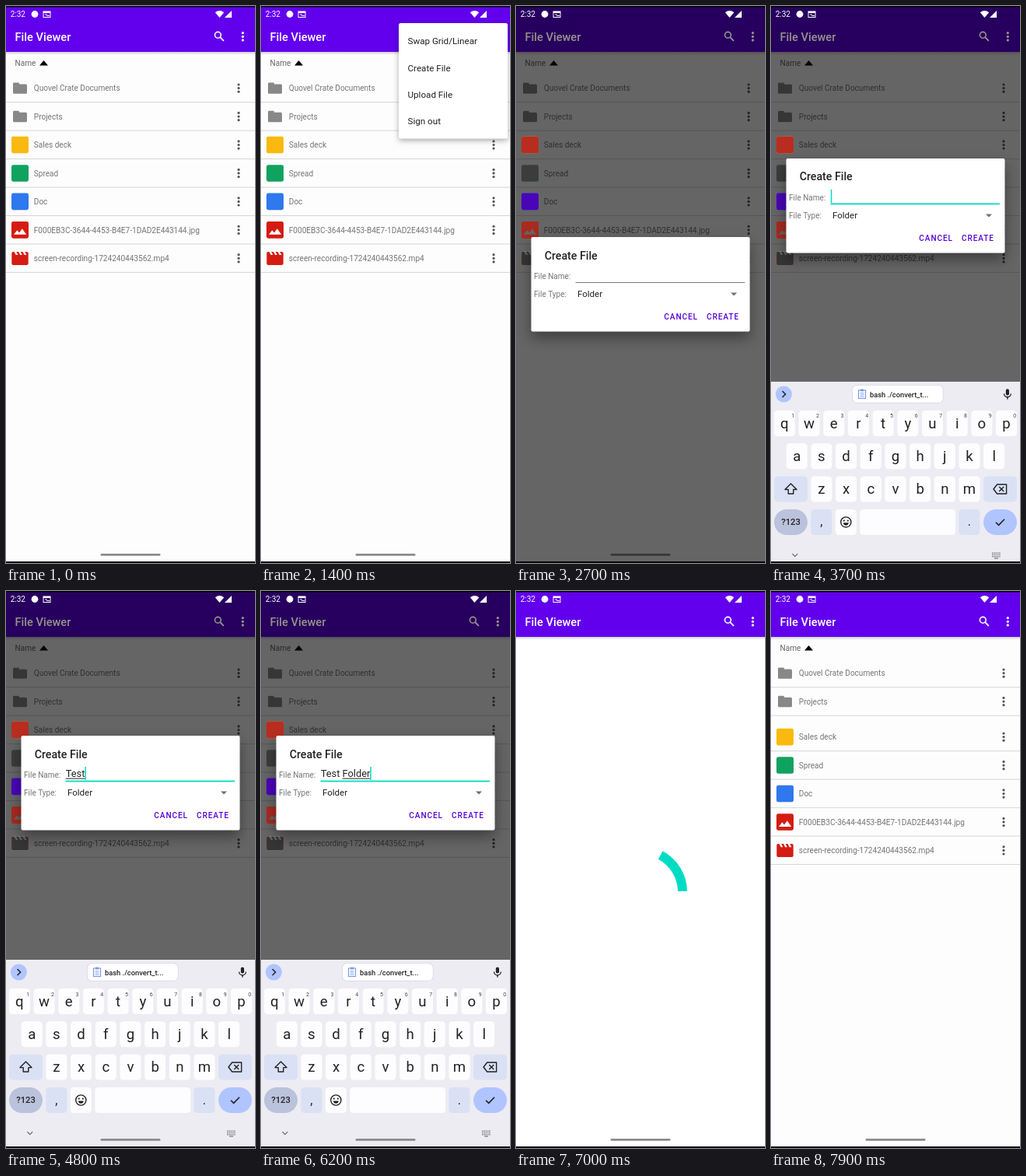
An HTML page with a canvas for the animation above (8000 ms loop, 320x716 px).

```html
<!DOCTYPE html>
<html lang="en">
<head>
<meta charset="utf-8">
<title>File Viewer</title>
<style>
html, body { margin: 0; width: 100%; height: 100%; overflow: hidden; background: #fff; }
canvas { display: block; width: 100vw; height: 100vh; }
</style>
</head>
<body>
<canvas id="stage"></canvas>
<script>
const W = 320, H = 716, LOOP = 8000, STEP = 100;
const PURPLE = '#6200ee', TEAL = '#03dac5', GREY = '#757575', INK = '#222';
const canvas = document.getElementById('stage');
const dpr = window.devicePixelRatio || 1;
canvas.width = W * dpr;
canvas.height = H * dpr;
const c = canvas.getContext('2d');

// Drawing helpers
const ramp = (t, a, b) => Math.min(1, Math.max(0, (t - a) / (b - a)));

function rect(x, y, w, h, fill) {
  c.fillStyle = fill;
  c.fillRect(x, y, w, h);
}

function round(x, y, w, h, r, fill) {
  c.fillStyle = fill;
  c.beginPath();
  c.roundRect(x, y, w, h, r);
  c.fill();
}

function dot(x, y, r, fill) {
  c.fillStyle = fill;
  c.beginPath();
  c.arc(x, y, r, 0, 7);
  c.fill();
}

function poly(points, fill) {
  c.fillStyle = fill;
  c.beginPath();
  points.forEach(([x, y]) => c.lineTo(x, y));
  c.closePath();
  c.fill();
}

function line(points, color, width = 1) {
  c.strokeStyle = color;
  c.lineWidth = width;
  c.beginPath();
  points.forEach(([x, y]) => c.lineTo(x, y));
  c.stroke();
}

function text(s, x, y, size, fill, { weight = 400, align = 'left', gap = 0 } = {}) {
  c.font = `${weight} ${size}px Roboto, sans-serif`;
  c.textAlign = align;
  c.letterSpacing = gap + 'px';
  c.fillStyle = fill;
  c.fillText(s, x, y);
}

function textWidth(s, size) {
  c.font = `400 ${size}px Roboto, sans-serif`;
  c.letterSpacing = '0px';
  return c.measureText(s).width;
}

function group(alpha, dx, dy, draw) {
  c.save();
  c.globalAlpha = alpha;
  c.translate(dx, dy);
  draw();
  c.restore();
}

function raised(x, y, w, h, r, blur, drop, dark) {
  c.save();
  c.shadowColor = `rgba(0,0,0,${dark})`;
  c.shadowBlur = blur * dpr;
  c.shadowOffsetY = drop * dpr;
  round(x, y, w, h, r, '#fff');
  c.restore();
}

function moreDots(x, y, fill) {
  for (const d of [-4.6, 0, 4.6]) dot(x, y + d, 1.6, fill);
}

// App screen
function statusBar() {
  text('2:32', 5.7, 14.3, 10, '#fff');
  dot(37, 10.5, 4.4, '#fff');
  c.strokeStyle = '#fff';
  c.lineWidth = 1;
  c.strokeRect(48, 7, 9, 7.5);
  rect(48, 7, 9, 2, '#fff');
  rect(50, 10.4, 3, 1, '#fff');
  rect(52, 12, 4, 1, '#fff');
  c.fillStyle = '#fff';
  c.beginPath();
  c.moveTo(274.5, 15);
  c.lineTo(268.8, 8.2);
  c.quadraticCurveTo(274.5, 4, 280.2, 8.2);
  c.fill();
  poly([[281, 15], [290, 15], [290, 6]], '#fff');
}

function titleBar(color) {
  text('File Viewer', 11.5, 44.8, 14.6, color, { weight: 500 });
  c.strokeStyle = color;
  c.lineWidth = 1.6;
  c.beginPath();
  c.arc(272.3, 37.3, 3.9, 0, 7);
  c.stroke();
  line([[275.2, 40.2], [279.8, 44.8]], color, 1.9);
  moreDots(304.3, 39.3, color);
}

function handle() {
  round(121.5, 704, 77, 2.8, 1.4, '#8b8b8b');
}

const ROW = 36.45, FIRST = 105.6;
const rows = [
  ['Quovel Crate Documents', 'folder', '#888', '#363636'],
  ['Projects', 'folder', '#888', '#363636'],
  ['Sales deck', 'square', '#f9b90f', '#b92d20'],
  ['Spread', 'square', '#10a25f', '#3c3c3c'],
  ['Doc', 'square', '#2f78ee', '#4a05b8'],
  ['F000EB3C-3644-4453-B4E7-1DAD2E443144.jpg', 'image', '#d51c12', '#a82a20'],
  ['screen-recording-1724240443562.mp4', 'video', '#d51c12', '#353535']
];

const rowY = (i, shift) => FIRST + i * ROW + (i > 1 ? shift : 0);

const icons = {
  folder(color) {
    round(9, -7.2, 8, 5, 1.4, color);
    round(9, -5.2, 18, 12.4, 1.6, color);
  },
  square(color) {
    round(7, -10.8, 22, 21.6, 2.4, color);
  },
  image(color, mark) {
    icons.square(color);
    poly([[10, 6], [14.4, 0.4], [17, 3.6], [20.8, -1.6], [26.2, 6]], mark);
  },
  video(color, mark) {
    round(7.3, -8.4, 21.4, 17, 1.8, color);
    for (const x of [10.4, 15.9, 21.4]) {
      poly([[x, -8.6], [x + 2.7, -8.6], [x + 5, -4.2], [x + 2.3, -4.2]], mark);
    }
  }
};

function fileList(shift) {
  text('Name', 11.6, 77.2, 10, '#666');
  poly([[43, 76.6], [48.5, 70], [54, 76.6]], '#000');
  rows.forEach(([name], i) => {
    const y = rowY(i, shift);
    text(name, 35.8, y + 3.8, 10.05, GREY);
    moreDots(299, y, '#555');
    rect(0, y + 17.6, W, 1, '#d6d6d6');
  });
}

function fileIcons(shift, dim) {
  rows.forEach(([, kind, color, shaded], i) => {
    group(1, 0, rowY(i, shift), () => {
      icons[kind](color, '#fff');
      c.globalAlpha = dim;
      if (dim) icons[kind](shaded, '#666');
    });
  });
}

function screen(t, dim, loading) {
  rect(0, 0, W, H, loading ? '#fff' : '#fdfdfd');
  const shade = c.createLinearGradient(0, 58, 0, 63);
  shade.addColorStop(0, 'rgba(0,0,0,.22)');
  shade.addColorStop(1, 'rgba(0,0,0,0)');
  rect(0, 58, W, 5, shade);
  rect(0, 0, W, 59, PURPLE);
  const insert = (1 - Math.cos(Math.PI * ramp(t, 7800, 8100))) / 2;
  const shift = ROW * insert;
  if (!loading) fileList(shift);
  handle();
  rect(0, 0, W, H, `rgba(0,0,0,${0.6 * dim})`);
  if (!loading) fileIcons(shift, dim);
  titleBar(dim > 0.5 ? '#96938a' : '#fff');
  statusBar();
}

// Overflow menu
function menu(pressed) {
  raised(177, 22, 140, 148.5, 2.5, 7, 2.5, 0.32);
  if (pressed) rect(177, 62.5, 140, 34.5, '#e4e4e4');
  ['Swap Grid/Linear', 'Create File', 'Upload File', 'Sign out'].forEach((s, i) =>
    text(s, 188.5, 49.2 + i * 34.3, 11.65, INK));
}

// Dialog, drawn with its top edge at 0
const typed = 'Test Folder';
const keyTimes = [4300, 4400, 4500, 4700, 4900, 5100, 5300, 5500, 5600, 5800, 6000];

function dialog(t) {
  raised(19.5, 0, 281, 121.5, 2, 18, 8, 0.4);
  text('Create File', 36.7, 28.5, 14.2, INK, { weight: 500 });
  text('File Name:', 23, 54.3, 10, GREY);
  text('File Type:', 23, 77.3, 10, GREY);
  text('Folder', 79, 77.3, 11.5, INK);
  poly([[276, 71.5], [284, 71.5], [280, 75.5]], '#707070');
  const action = { weight: 500, gap: 0.95 };
  if (t >= 6700) round(241, 91, 50, 22, 2, 'rgba(98,0,238,.14)');
  text('CANCEL', 190.3, 105.6, 10, '#5600d4', action);
  text('CREATE', 245, 105.6, 10, '#5600d4', action);
  if (t < 3300) {
    rect(76.5, 58, 217.5, 1, '#777');
    return;
  }
  rect(76.5, 57.6, 217.5, 1.8, TEAL);
  const value = typed.slice(0, keyTimes.filter(k => t >= k).length);
  const size = 12.8, x = 76.8;
  const end = x + textWidth(value, size);
  text(value, x, 52.8, size, INK);
  const word = value.lastIndexOf(' ') + 1;
  const start = x + textWidth(value.slice(0, word), size);
  if (end > start) rect(start, 54.6, end - start, 1, INK);
  rect(end, 40, 1.5, 17, TEAL);
}

// Keyboard
const KEY_TOP = 474, PITCH = 31.68;
const SOFT = '#dae1f5', ACCENT = '#b0c4ff';

function keyRow(letters, x, y, digits) {
  [...letters].forEach((ch, i) => {
    const mid = x + i * PITCH;
    round(mid - 13.5, y, 27, 33, 4.5, '#fdfdff');
    text(ch, mid, y + 22.6, 18.6, INK, { align: 'center' });
    if (digits) text((i + 1) % 10, mid + 10.8, y + 9.5, 7, '#444', { align: 'center' });
  });
}

function suggestions() {
  dot(16.4, 490, 10.5, ACCENT);
  line([[14.6, 486], [18.6, 490], [14.6, 494]], INK, 1.5);
  round(104, 478, 117.5, 23.5, 6, '#d3d6e2');
  round(104.8, 478.8, 116, 22, 5.5, '#fff');
  c.strokeStyle = '#7c9be8';
  c.lineWidth = 1.2;
  c.strokeRect(112.5, 485, 9, 10.5);
  rect(115, 483.6, 4, 2.8, '#7c9be8');
  for (const y of [488.2, 490.4, 492.6]) rect(114.5, y, 5, 0.9, '#7c9be8');
  text('bash ./convert_t...', 127, 493.6, 9.3, INK, { weight: 500 });
  round(301.8, 483.4, 4.2, 8.2, 2.1, INK);
  c.strokeStyle = INK;
  c.lineWidth = 1.3;
  c.beginPath();
  c.arc(303.9, 489.4, 4.4, 0, Math.PI);
  c.stroke();
  rect(303.2, 493.6, 1.4, 3, INK);
}

function specialKeys() {
  round(4, 595.5, 43, 33, 5, SOFT);
  c.lineJoin = 'round';
  line([[25.5, 605], [18, 612.6], [22.2, 612.6], [22.2, 618], [28.8, 618],
    [28.8, 612.6], [33, 612.6], [25.5, 605], [18, 612.6]], INK, 1.4);
  round(273, 595.5, 43, 33, 5, SOFT);
  line([[286, 612], [290.6, 606], [302.6, 606], [302.6, 618], [290.6, 618],
    [286, 612], [290.6, 606]], INK, 1.4);
  line([[293.2, 609], [299.2, 615]], INK, 1.4);
  line([[299.2, 609], [293.2, 615]], INK, 1.4);

  round(4, 638, 43, 33, 16.5, '#bac2dc');
  text('?123', 25.5, 658.2, 11.2, INK, { weight: 500, align: 'center' });
  round(51.3, 638, 27, 33, 4.5, SOFT);
  text(',', 64.8, 659.5, 16, INK, { align: 'center' });
  round(82.8, 638, 27, 33, 4.5, '#fdfdff');
  c.strokeStyle = INK;
  c.lineWidth = 1.4;
  c.beginPath();
  c.arc(96.3, 654.5, 6.6, 0, 7);
  c.stroke();
  dot(93.8, 652.6, 1.1, INK);
  dot(98.8, 652.6, 1.1, INK);
  c.beginPath();
  c.arc(96.3, 655.4, 3.3, 0, Math.PI);
  c.fill();
  round(114.3, 638, 122.7, 33, 4.5, '#fdfdff');
  round(241.4, 638, 27, 33, 4.5, SOFT);
  text('.', 254.9, 659.5, 16, INK, { align: 'center' });
  round(273, 638, 43, 33, 16.5, ACCENT);
  line([[289, 654.8], [292.6, 658.4], [300, 650.8]], INK, 1.6);
}

function keyboard(t) {
  rect(0, KEY_TOP, W, H, '#edecf3');
  suggestions();
  keyRow('qwertyuiop', 17.4, 511, true);
  keyRow('asdfghjkl', 33.2, 553.3);
  keyRow('zxcvbnm', 64.9, 595.5);
  specialKeys();
  line([[27.4, 695.2], [30.8, 698.6], [34.2, 695.2]], '#666', 1.2);
  for (let i = 0; i < 15; i++) {
    rect(284 + (i % 5) * 2.3, 693.5 + Math.floor(i / 5) * 2.3, 1.4, 1.4, '#777');
  }
  rect(287, 700.4, 5, 1.2, '#777');
  if (t >= 4300) handle();
}

// Loading ring: head runs ahead of the tail while the whole ring turns
function easeInOut(x) {
  let lo = 0, hi = 1;
  for (let i = 0; i < 20; i++) {
    const s = (lo + hi) / 2, r = 1 - s;
    if (1.2 * r * r * s + 0.6 * r * s * s + s ** 3 < x) lo = s; else hi = s;
  }
  return 3 * (1 - lo) * lo * lo + lo ** 3;
}

function spinner(t) {
  const dt = t - 6837, half = 666.5, rad = Math.PI / 180;
  const base = -99 + dt * (90 / 1333 + 720 / 4444);
  const head = base + 270 * easeInOut(ramp(dt, 0, half));
  const tail = base + 270 * easeInOut(ramp(dt, half, 2 * half));
  c.strokeStyle = '#00dcc4';
  c.lineWidth = 12;
  c.beginPath();
  c.arc(160, 387, 54, tail * rad, head * rad);
  c.stroke();
}

function draw(t) {
  c.setTransform(dpr, 0, 0, dpr, 0, 0);
  const loading = t >= 6900 && t < 7800;
  const leave = 1 - ramp(t, 6700, 6900);
  const shown = ramp(t, 2400, 2700) * leave;
  screen(t, shown, loading);

  if (t >= 500 && t < 800) {
    dot(304.3, 39.3, 8 + 8 * ramp(t, 400, 700), 'rgba(255,255,255,.2)');
  }
  const menuAlpha = ramp(t, 600, 800) * (1 - ramp(t, 2300, 2500));
  if (menuAlpha) group(menuAlpha, 0, 0, () => menu(t >= 2200));

  if (shown) {
    const rest = 1 - ramp(t, 3300, 3900);
    const top = 297 - 111 * (1 - rest ** 2.2);
    group(shown, 0, top, () => dialog(t));
    const drop = 242 * (t < 6700 ? rest ** 3 : 1 - leave);
    if (drop < 242) group(1, 0, drop, () => keyboard(t));
  }
  if (loading) spinner(t);
  rect(0, 0, W, 1.5, '#000');
  rect(0, 714, W, 2, '#000');
}

const origin = performance.now();
function tick() {
  const t = (performance.now() - origin) % LOOP;
  draw(Math.floor(t / STEP) * STEP);
  requestAnimationFrame(tick);
}
tick();
</script>
</body>
</html>
```
